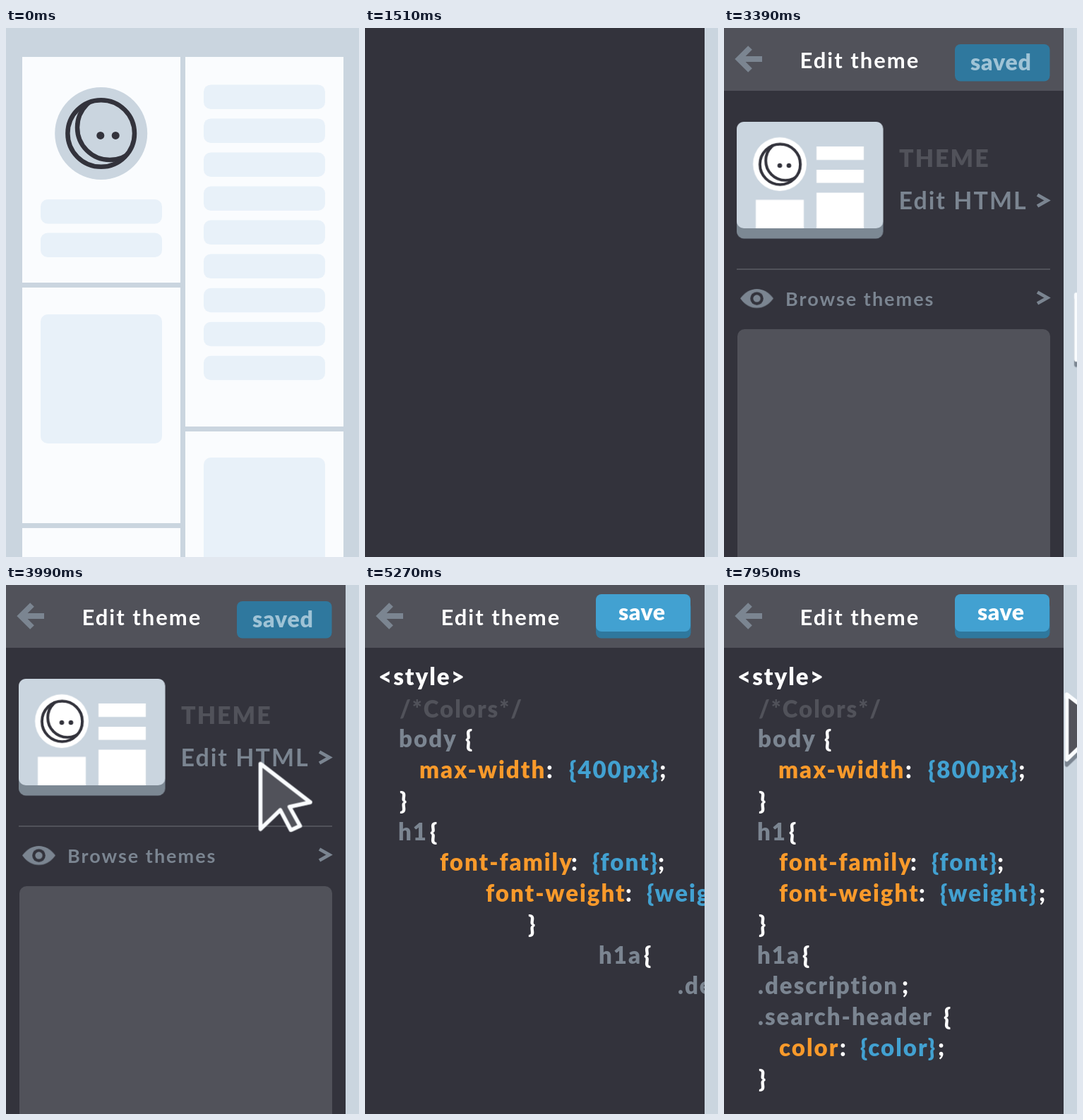
An HTML page for the animation above (7990 ms loop, 500 px wide and 750 px high).

```html
<!DOCTYPE html>
<html lang="en">
<head>
<meta charset="utf-8">
<title>Edit theme</title>
<style>
  html, body { margin: 0; width: 100%; height: 100%; overflow: hidden; background: #cad5df; }
  svg { display: block; }
  body > svg { width: 100vw; height: 100vh; }
  text { font: 900 33px Lato, "Open Sans", sans-serif; letter-spacing: 2px; white-space: pre; }

  .white, .code { fill: #fff; }
  .card { fill: #fafcfe; }
  .bar { fill: #e8f1f9; }
  .sky { fill: #cad5df; }
  .slate { fill: #51525a; }
  .grey { fill: #7b8591; }
  .orange { fill: #f99a2b; }
  .blue { fill: #42a1d1; }
  .deep { fill: #2f789e; }
  .stroke { fill: none; stroke: #7b8591; }

  /* Every animation shares one loop; --t shifts its start. */
  .anim { animation: 7990ms linear var(--t, 0ms) infinite both; }

  .stage { animation-name: push; }
  @keyframes push {
    0%, 16.269% { transform: none; }
    16.27%, 16.646% { transform: translateX(60px); animation-timing-function: cubic-bezier(.25, .5, .5, 1); }
    18.899%, 100% { transform: translateX(481px); }
  }

  .header { animation-name: drop; }
  @keyframes drop {
    0%, 20.025% { transform: translateY(-90px); animation-timing-function: ease-out; }
    22.5%, 100% { transform: none; }
  }

  .theme { animation-name: leave; }
  @keyframes leave {
    0%, 52.941% { transform: none; opacity: 1; animation-timing-function: cubic-bezier(.5, 0, .8, .6); }
    58.4% { transform: translateX(470px); opacity: 1; }
    58.41%, 100% { transform: translateX(470px); opacity: 0; }
  }

  .slide { animation-name: slide; }
  @keyframes slide {
    0% { transform: translate(var(--x, 0px), var(--y, 0px)); animation-timing-function: cubic-bezier(.3, .4, .4, 1); }
    3%, 60% { transform: none; }
    60.01%, 100% { transform: translate(var(--x, 0px), var(--y, 0px)); }
  }

  .pop, .moon { transform-box: fill-box; transform-origin: center; }
  .pop { animation-name: pop; }
  @keyframes pop {
    0% { transform: scale(0); animation-timing-function: ease-out; }
    2% { transform: scale(1.06); }
    3%, 60% { transform: none; }
    60.01%, 100% { transform: scale(0); }
  }

  .moon { animation-name: moon; }
  @keyframes moon {
    0% { transform: scale(0); animation-timing-function: ease-out; }
    1.5%, 2% { transform: scale(1.15); animation-timing-function: ease-in-out; }
    4%, 60% { transform: none; }
    60.01%, 100% { transform: scale(0); }
  }

  .rule { transform-box: fill-box; transform-origin: left; animation-name: rule; }
  @keyframes rule {
    0%, 25% { transform: scaleX(0); animation-timing-function: ease-out; }
    26.909%, 27.4% { transform: scaleX(.921); animation-timing-function: ease-out; }
    28.4%, 100% { transform: none; }
  }

  .hover { animation-name: hover; }
  @keyframes hover {
    0%, 47.93% { font-weight: 700; }
    47.94%, 100% { font-weight: 900; }
  }

  .saved { animation-name: saved; }
  @keyframes saved {
    0%, 55.443% { opacity: 1; }
    55.444%, 100% { opacity: 0; }
  }
  .save { animation-name: save; }
  @keyframes save {
    0%, 55.443% { transform: translateY(10px); opacity: 0; }
    55.444% { transform: translateY(10px); opacity: 1; animation-timing-function: ease-out; }
    57.4%, 100% { transform: none; opacity: 1; }
  }

  .code { animation-name: code; }
  @keyframes code {
    0%, 60.45% { opacity: 0; }
    60.451%, 100% { opacity: 1; }
  }
  .line { --t: calc(var(--i) * 40ms); animation-name: line; animation-timing-function: step-end; }
  @keyframes line {
    0% { transform: translateX(500px); }
    60.951% { transform: translateX(395px); }
    61.452% { transform: translateX(284px); }
    61.952% { transform: translateX(182px); }
    62.453% { transform: translateX(93px); }
    62.954% { transform: translateX(28px); }
    63.454%, 100% { transform: none; }
  }

  .erase .anim { --t: calc((7 - var(--i)) * 40ms); animation-name: erase; animation-timing-function: step-end; }
  @keyframes erase {
    0% { visibility: visible; }
    77.972%, 100% { visibility: hidden; }
  }
  .type .anim { --t: calc(var(--i) * 40ms); animation-name: type; animation-timing-function: step-end; }
  @keyframes type {
    0% { visibility: hidden; }
    88.486%, 100% { visibility: visible; }
  }

  .cursor { animation-name: cursor; }
  .cursor use { stroke-width: 5.5; stroke-linejoin: round; }
  @keyframes cursor {
    0%, 42.42% { transform: translate(515px, 394px); opacity: 1; }
    42.428% { transform: translate(499px, 378px); animation-timing-function: cubic-bezier(.3, .2, .4, 1); }
    48% { transform: translate(360.5px, 246px); }
    49.4%, 52.941% { transform: translate(360.5px, 253.5px); opacity: 1; }
    54.9% { transform: translate(360.5px, 253.5px); opacity: 0; }
    55%, 98.5% { transform: translate(515px, 187px); opacity: 0; }
    98.51% { transform: translate(515px, 187px); opacity: 1; }
    98.999% { transform: translate(499.5px, 171px); }
    99.499%, 100% { transform: translate(485.5px, 155px); opacity: 1; }
  }
  .shadow { animation-name: shadow; }
  @keyframes shadow {
    0%, 48% { transform: translateY(7.5px); }
    49.4%, 54.9% { transform: none; }
    55%, 100% { transform: translateY(7.5px); }
  }
</style>
</head>
<body>
<svg viewBox="0 0 500 750" preserveAspectRatio="none">
  <defs>
    <rect id="bar" class="bar" width="172" height="34.5" rx="10"/>
    <clipPath id="disc"><circle r="47.5"/></clipPath>
    <g id="face">
      <circle cx="12.3" cy="-8.5" r="46" fill="none" stroke="#33333c" stroke-width="6.5" clip-path="url(#disc)"/>
      <circle r="47.3" fill="none" stroke="#33333c" stroke-width="6.5"/>
      <circle cx="-.9" cy="2.9" r="5.5" fill="#33333c"/>
      <circle cx="20.5" cy="2.9" r="5.5" fill="#33333c"/>
    </g>
    <path id="chevron" class="stroke" d="M-7-8L7 0L-7 8" stroke-width="4.8"/>
    <path id="arrow" d="M0 0L70.5 54.5L41 61L56 88L43 94L28 65.5L0 92.5Z"/>
  </defs>

  <g class="anim stage">
    <g class="page">
      <rect class="card" x="23" y="41" width="224" height="320"/>
      <rect class="card" x="23" y="368" width="224" height="334"/>
      <rect class="card" x="23" y="709" width="224" height="60"/>
      <rect class="card" x="254" y="41" width="224" height="524"/>
      <rect class="card" x="254" y="572" width="224" height="200"/>
      <circle class="sky" cx="134.7" cy="149.5" r="65.5"/>
      <use href="#face" x="134.7" y="149.5"/>
      <use href="#bar" x="49" y="243"/>
      <use href="#bar" x="49" y="290.5"/>
      <rect class="bar" x="49" y="406" width="172" height="183" rx="10"/>
      <use href="#bar" x="280" y="80.4"/>
      <use href="#bar" x="280" y="128.4"/>
      <use href="#bar" x="280" y="176.5"/>
      <use href="#bar" x="280" y="224.5"/>
      <use href="#bar" x="280" y="272.6"/>
      <use href="#bar" x="280" y="320.6"/>
      <use href="#bar" x="280" y="368.7"/>
      <use href="#bar" x="280" y="416.7"/>
      <use href="#bar" x="280" y="464.7"/>
      <rect class="bar" x="280" y="609" width="172" height="183" rx="10"/>
    </g>

    <svg x="-481" width="481" height="750" overflow="hidden">
      <rect width="481" height="750" fill="#33333c"/>

      <g class="anim theme">
        <rect class="slate anim slide" style="--t:1700ms;--y:330px" x="19" y="427" width="443" height="340" rx="10"/>
        <g class="anim pop" style="--t:1790ms">
          <rect x="18" y="147" width="207.5" height="151.5" rx="10" fill="#7c8893"/>
          <rect class="sky" x="18" y="133" width="207.5" height="151" rx="10"/>
          <path class="white" d="M131 168h67v19h-67zM131 201h67v18.5h-67zM131 233.5h67v50.5h-67zM45 243.5h68v40.5h-68z"/>
          <circle class="white" cx="79" cy="193" r="38"/>
        </g>
        <g class="anim moon" style="--t:2030ms">
          <use href="#face" transform="translate(79.5 193.3) scale(.605)"/>
        </g>
        <g class="anim slide" style="--t:1850ms;--x:240px">
          <text class="slate" x="248" y="196.5" style="font-size:34px">THEME</text>
        </g>
        <g class="anim slide" style="--t:2190ms;--x:240px">
          <text class="grey anim hover" x="247.5" y="257" style="font-size:34px">Edit HTML</text>
          <use href="#chevron" x="451" y="244.5"/>
        </g>
        <rect class="slate anim rule" x="18" y="341" width="444" height="2"/>
        <g class="anim pop" style="--t:2155ms">
          <path class="grey" d="M23 383.5Q33 370 46.5 370T70 383.5Q60 397 46.5 397T23 383.5Z"/>
          <circle cx="46.5" cy="383.5" r="9.3" fill="#33333c"/>
        </g>
        <circle class="grey anim pop" style="--t:2060ms" cx="46.5" cy="383.5" r="5.2"/>
        <g class="anim slide" style="--t:2270ms;--x:400px">
          <text class="grey" x="87" y="393.5" style="font-size:27px;font-weight:700">Browse themes</text>
          <use href="#chevron" x="451" y="382.5"/>
        </g>
      </g>

      <g class="anim code">
        <text class="anim line" style="--i:0" y="142"><tspan x="19">&lt;style&gt;</tspan></text>
        <text class="anim line" style="--i:1" y="188"><tspan class="slate" x="49">/*Colors*/</tspan></text>
        <text class="anim line" style="--i:2" y="230"><tspan class="grey" x="48">body</tspan><tspan x="142">{</tspan></text>
        <text class="anim line" style="--i:3" y="274"><tspan class="orange" x="77">max-width</tspan><tspan x="257">:</tspan><tspan class="blue erase" x="289">{400px};</tspan><tspan class="blue type" x="289">{800px};</tspan></text>
        <text class="anim line" style="--i:4" y="318"><tspan x="49">}</tspan></text>
        <text class="anim line" style="--i:5" y="362"><tspan class="grey" x="47">h1</tspan><tspan x="92">{</tspan></text>
        <text class="anim line" style="--i:6" y="405"><tspan class="orange" x="78">font-family</tspan><tspan x="264">:</tspan><tspan class="blue" x="294">{font}</tspan><tspan x="387">;</tspan></text>
        <text class="anim line" style="--i:7" y="449"><tspan class="orange" x="78">font-weight</tspan><tspan x="276">:</tspan><tspan class="blue" x="306">{weight}</tspan><tspan x="446">;</tspan></text>
        <text class="anim line" style="--i:8" y="493"><tspan x="49">}</tspan></text>
        <text class="anim line" style="--i:9" y="537"><tspan class="grey" x="47">h1a</tspan><tspan x="111">{</tspan></text>
        <text class="anim line" style="--i:10" y="580"><tspan class="grey" x="48">.description</tspan><tspan x="252">;</tspan></text>
        <text class="anim line" style="--i:11" y="624"><tspan class="grey" x="48">.search-header</tspan><tspan x="311">{</tspan></text>
        <text class="anim line" style="--i:12" y="668"><tspan class="orange" x="78">color</tspan><tspan x="164">:</tspan><tspan class="blue" x="193">{color}</tspan><tspan x="303">;</tspan></text>
        <text class="anim line" style="--i:13" y="712"><tspan x="49">}</tspan></text>
      </g>

      <g class="anim header">
        <rect class="slate" width="481" height="89"/>
        <path class="stroke" d="M37 28L21 44L37 60M21 44H54" stroke-width="8"/>
        <text class="white" x="107.5" y="57" style="font-size:31px;font-weight:700">Edit theme</text>
        <rect class="deep" x="327" y="23" width="134.5" height="52.5" rx="8"/>
        <text class="anim saved" x="349" y="60" fill="#9fc3d6" style="font-size:32px;letter-spacing:.8px">saved</text>
        <g class="anim save">
          <rect class="blue" x="327" y="13" width="134" height="53" rx="8"/>
          <text class="white" x="359" y="49.5" style="font-size:32px;letter-spacing:.6px">save</text>
        </g>
      </g>
    </svg>
  </g>

  <g class="anim cursor">
    <g class="anim shadow"><use href="#arrow" fill="#7b8591" stroke="#7b8591"/></g>
    <use href="#arrow" fill="#51525a" stroke="#fafcfe"/>
  </g>
</svg>
<script>
  // Split the edited value so that each character can appear and vanish alone.
  for (const value of document.querySelectorAll('.erase, .type')) {
    const chars = [...value.textContent];
    value.textContent = '';
    chars.forEach((char, i) => {
      const span = document.createElementNS(value.namespaceURI, 'tspan');
      span.textContent = char;
      span.setAttribute('class', char === ';' ? 'anim white' : 'anim');
      span.style.setProperty('--i', i);
      value.append(span);
    });
  }
</script>
</body>
</html>
```
